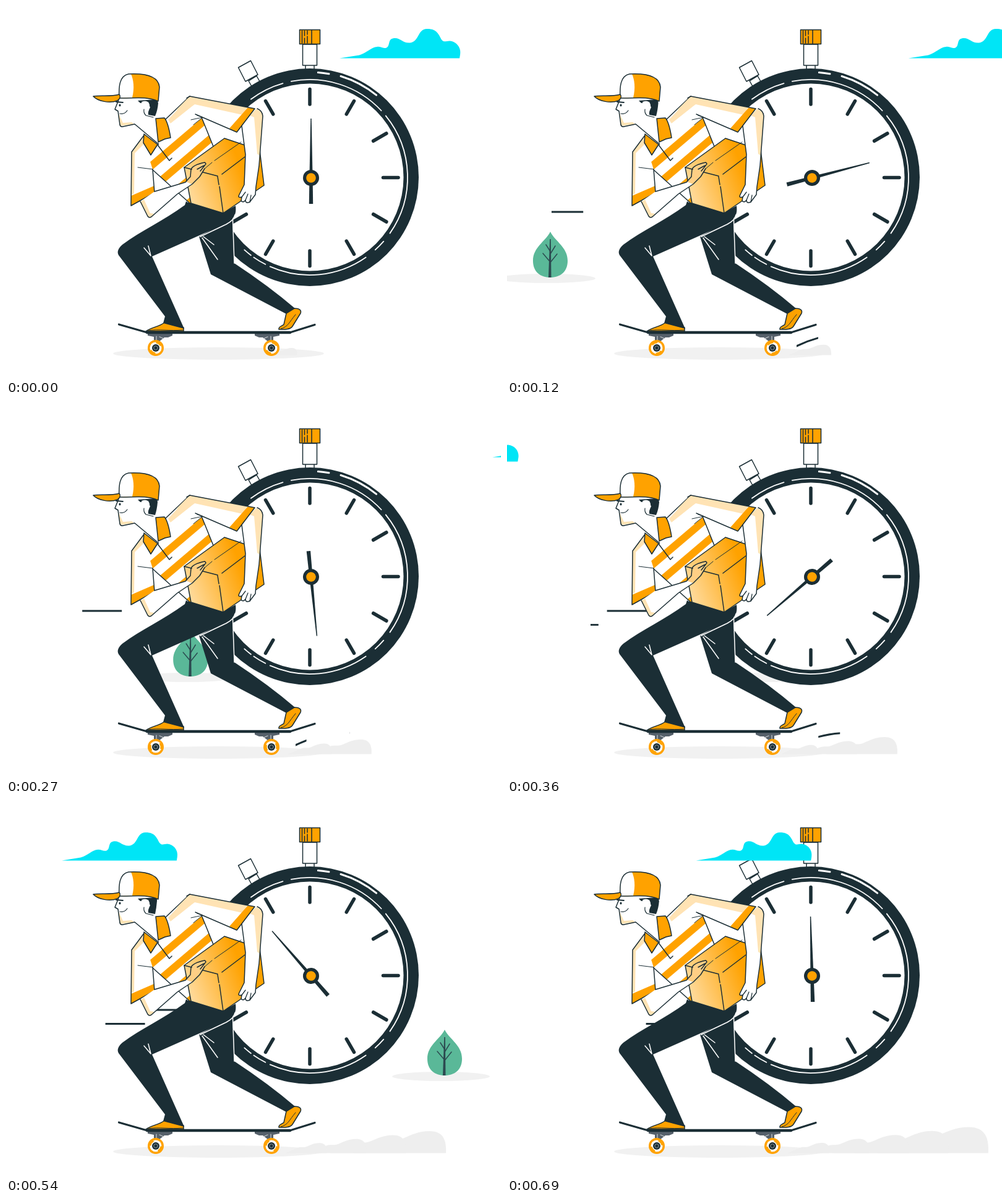
These frames come from a looping animation (800 by 600 pixels, 720 ms). An HTML page with a canvas:

```html
<!DOCTYPE html>
<html lang="en">
<head>
<meta charset="utf-8">
<title>Express delivery</title>
<style>
html, body { margin: 0; width: 100%; height: 100%; overflow: hidden; background: #fff; }
canvas { display: block; }
</style>
</head>
<body>
<canvas id="stage" width="800" height="600"></canvas>
<script>
const ctx = document.getElementById('stage').getContext('2d');
const LOOP = 720, STEP = 30;
const DARK = '#1b2e35', ORANGE = '#ffa200', CREAM = '#ffe3b4', CYAN = '#00e5f6', WHITE = '#fff';
const SHADOW = '#f1f1f1', DUST = '#eeeeee', GREEN = '#5ab898';
const rad = deg => deg * Math.PI / 180;

function fill(d, color) {
  ctx.fillStyle = color;
  ctx.fill(new Path2D(d));
}

function line(d, width = 1.5, color = DARK, cap = 'round') {
  ctx.strokeStyle = color;
  ctx.lineWidth = width;
  ctx.lineCap = cap;
  ctx.lineJoin = 'round';
  ctx.stroke(new Path2D(d));
}

function shape(d, color, width = 1.5) {
  fill(d, color);
  line(d, width);
}

function oval(x, y, rx, ry, color) {
  ctx.fillStyle = color;
  ctx.beginPath();
  ctx.ellipse(x, y, rx, ry, 0, 0, Math.PI * 2);
  ctx.fill();
}

function arc(x, y, r, from, to, width, color) {
  ctx.strokeStyle = color;
  ctx.lineWidth = width;
  ctx.lineCap = 'round';
  ctx.beginPath();
  ctx.arc(x, y, r, rad(from), rad(to));
  ctx.stroke();
}

function at(x, y, scale, angle, draw) {
  ctx.save();
  ctx.translate(x, y);
  ctx.rotate(angle);
  ctx.scale(scale, scale);
  draw();
  ctx.restore();
}

// Constant start, soft landing: cubic-bezier(.167, .167, .667, 1).
function settle(p) {
  const curve = (a, b, s) => 3 * a * s * (1 - s) ** 2 + 3 * b * s * s * (1 - s) + s ** 3;
  let lo = 0, hi = 1;
  for (let i = 0; i < 24; i++) {
    const mid = (lo + hi) / 2;
    if (curve(.167, .667, mid) < p) lo = mid; else hi = mid;
  }
  return curve(.167, 1, lo);
}

function cloud(x, base, scale) {
  at(x, base, scale, 0, () => fill(
    'M0 0 L32 -5 C45 -9 51 -18 61 -18.5 C67 -19 70 -15 76 -17 C82 -20 78 -30 86 -32 ' +
    'C98 -35 101 -24 114 -25 C129 -27 126 -47 141 -47.5 C157 -48 160 -39 165 -30 ' +
    'C169 -25 172 -28 178 -28 C190 -27 197 -16 195 -6 L194 0 Z', CYAN));
}

function tree(x) {
  oval(x - 6, 440.5, 79, 7.5, SHADOW);
  at(x, 439, 1, 0, () => {
    fill('M0 -74 C8 -58 28 -49 28 -27 C28 -9 16 0 0 0 C-16 0 -28 -9 -28 -27 C-28 -49 -8 -58 0 -74', GREEN);
    fill('M-3 0 L-.8 -62 L.8 -62 L1.5 0 Z', '#2c4a50');
    line('M-1 -23 L11 -38 M-1 -26 L-12 -39 M0 -38 L8 -51 M0 -42 L-7 -53', 1.5, '#2c4a50');
  });
}

function stopwatch() {
  const x = 491, y = 277;
  shape('M392 121 L405 113 L410 122 L397 130 Z', WHITE);
  shape('M375.5 99.5 L395.5 88.5 L407 111 L387 122 Z', WHITE);
  shape('M484 95 H498 V103 H484 Z', WHITE);
  shape('M479.5 62 H502.5 V96 H479.5 Z', WHITE);
  shape('M474.5 38.5 H507.5 V61.5 H474.5 Z', ORANGE);
  line('M478.5 40 V60 M482.5 40 V48 M482.5 52 V60 M487 40 V46 M487 49 V60 M494 39 V61');
  oval(x, y, 176, 176, DARK);
  oval(x, y, 151.5, 151.5, WHITE);
  [[233, 254], [259, 317], [321, 395], [41, 48], [55, 114], [117, 125], [127, 132]]
    .forEach(([from, to]) => arc(x, y, 158, from, to, 1.8, WHITE));
  arc(x, y, 170, 274.5, 280.5, 3, WHITE);
  arc(x, y, 171, 287, 309, 3, WHITE);
  for (let i = 0; i < 12; i++) at(x, y + .5, 1, rad(i * 30), () => line('M0 -118.5 V-143', 5.5));
}

function hand(t) {
  at(493, 278, 1, rad(360 * settle(t / LOOP)), () => {
    fill('M-.7 -96 H.7 L2.6 0 L3.2 42 H-3.2 L-2.6 0 Z', DARK);
    oval(0, 0, 13, 13, DARK);
    oval(0, 0, 7.8, 7.8, ORANGE);
  });
}

// A streak grows to full length from its origin, then slides on.
function streak(age, origin, y) {
  if (age <= 0) return;
  const head = origin + .4267 * age;
  line(`M${Math.max(origin, head - 64)} ${y} H${head}`, 2.8, DARK, 'butt');
}

function kick(age) {
  const from = 468, to = 556, head = Math.min(to, from + .585 * age), tail = Math.max(from, from + .585 * age - 35);
  if (age <= 0 || tail >= to) return;
  ctx.save();
  ctx.beginPath();
  ctx.rect(tail, 520, head - tail, 40);
  ctx.clip();
  line('M467 550.5 Q513 528 560 530.5', 3, DARK, 'butt');
  ctx.restore();
}

function puff(age) {
  if (age < 0) return;
  at(470.5 + .4455 * age, 564.5, 11.5 + .0443 * age, 0, () => fill(
    'M0 0 C.03 -.55 -.1 -1 -.75 -1 C-1.25 -1 -1.6 -.82 -2 -.65 C-2.3 -.52 -2.5 -.63 -2.8 -.55 ' +
    'C-3.4 -.38 -3.7 -.05 -4.3 0 Z', DUST));
}

function legs() {
  fill('M312 373 L366 343 L369 416 Q425 453 467 489 L453 498 L331 434 Z', DARK);
  line('M366.5 346 L369 416', 1.5, WHITE);
  line('M317 375 L342 410 M319 373 L336 386', 1.5, WHITE);
  shape('M453 497 L466 489 C474 489 478 492 476 497 L463 518 C459 524 449 523 441 523 C440 518 446 518 449 515 Z', ORANGE);
  line('M444 522 C456 519 457 512 468 499', 1);
  shape('M226 526 C236 519 247 519 256 512 L287 520 V526 Z', ORANGE);
  line('M229 525 C248 522 263 526 286 524', 1);
  fill('M291 316 L351 334 L371 323 C373 338 368 345 353 353 L236 405 L288 522 L254 513 L257 502 ' +
    'L182 403 C179 398 181 392 188 386 C217 364 255 347 289 322 Z', DARK);
  line('M314 373 L356 353 Q369 346 370 338', 1.8, WHITE);
  line('M223 391 L234 404 L230 388', 1.5, WHITE);
}

function torso() {
  fill('M222 209 L262 184 L297 146 L385 185 L390 260 L340 318 H294 L228 256 Z', WHITE);
  ctx.save();
  ctx.clip(new Path2D('M227 256 L316 180 L335 227 L340 318 L296 318 Z'));
  for (let i = 0; i < 4; i++) {
    const x = 233 + 21.5 * i, y = 260 + 19 * i;
    line(`M${x} ${y} l100 -85`, 12, ORANGE, 'square');
  }
  ctx.restore();
  line('M227 256 L296 318 M316 180 L335 227');
  fill('M262 184 L297 146 L390 165 L381 175 L305 159 L266 190 Z', CREAM);
  fill('M266 190 L305 159 L318 180 L280 200 Z', WHITE);
  line('M257 184 L297 146');
  line('M318 180 L299 184 M318 180 L303 192 M318 180 L309 177', 1);
}

function nearSleeve() {
  fill('M223 209 L203 236 L202 323 L240 302 L237 264 L228 236 Z', WHITE);
  fill('M223 210 L203 236 L202 306 L207 303 L208 238 L224 222 Z', CREAM);
  fill('M202 307 L239 291 L240 302 L202 323 Z', ORANGE);
  line('M223 209 L203 236 L202 323 L240 302 L237 264');
  line('M213 261 L237 264', 1);
}

function parcel() {
  const box = 'M288 261 L353 214 L410 233 L417 290 L351 335 L299 319 Z';
  const glow = ctx.createLinearGradient(292, 302, 382, 268);
  glow.addColorStop(0, '#ffdca0');
  glow.addColorStop(1, ORANGE);
  shape(box, glow);
  line('M288 261 L342 275 M349 272 L386 244 M342 276 L344 289 M345 292 L351 335');
  line('M320 264 L333 253 M337 250 L380 220', 1);
}

function nearArm() {
  fill('M217 316 L229 340 Q232 344 236 340 L275 305 L302 288 L291 284 L240 300 Z', WHITE);
  fill('M217 317 L229 340 Q232 344 236 340 L240 336 L233 335 L223 313 Z', CREAM);
  fill('M291 284 L298 276 L302 259 L322 253 Q325 256 318 259 L321 262 L313 276 L300 288 Z', '#ffcf85');
  line('M217 316 L229 340 Q232 344 236 340 L277 304 L301 288 L313 276 L321 263');
  line('M240 300 L290 285 L298 276 L299 264 Q302 257 321 253 Q326 256 318 259 L309 264 M321 258 L314 267');
}

function farArm() {
  const limb = 'M381 194 L387 240 L385 289 L377 305 Q374 311 381 309 L380 315 Q383 319 387 314 ' +
    'Q387 320 394 317 L403 305 L404 292 L409 258 L415 178 Q414 169 406 166';
  fill(limb, WHITE);
  fill('M404 167 Q414 169 415 177 L410 242 L406 239 L401 180 L394 177 Z', CREAM);
  line(limb);
  line('M381 309 L387 301 M387 314 L391 304 M394 317 L396 306', 1.3);
  fill('M297 146 L402 166 L373 204 L318 180 Z', WHITE);
  fill('M297 146 L390 164 L382 176 L305 159 L282 171 L276 167 Z', CREAM);
  fill('M391 164 L402 166 L373 204 L361 198 Z', ORANGE);
  line('M292 149 L297 146 L402 166 L373 204 L306 175');
}

function head(t) {
  const sway = Math.cos(2 * Math.PI * t / 360);
  fill('M208 191 L222 172 L240 178 L245 222 Z', WHITE);
  fill('M183 147 L176 166 L181 170 L184 194 L208 191 L226 178 L238 150 Z', WHITE);
  fill('M181 172 L184 194 L207 191 L203 188 L189 189 Z', CREAM);
  line('M182 152 L176 167 L181 170 L184 192 Q185 196 189 195 L208 191 L245 222');
  line('M178 155 L189 156', 1.8);
  oval(184, 160.5, 1.5, 2, DARK);
  line('M184 174 Q191 176 196 169', 1.2);
  fill(`M213 153 L244 151 L${245 + sway} 157 Q${244 + sway} 169 241 178 L230 176 Q229 171 233 164 ` +
    'L229 155 L217 157 Z', DARK);
  fill('M219 155 Q230 151 232 160 Q232 167 224 168 Z', WHITE);
  line('M223 167 Q222 173 226 177 L238 180', 1.2);
  shape('M242 182 L256 181 Q262 188 266 213 L257 215 L246 220 Z', ORANGE);
  shape('M223 207 L245 224 L234 241 L222 221 Z', ORANGE);
  line('M246 222 V226 L264 250 L268 246');
  const crown = 'M183 149 C182 131 183 113 198 110 C218 109 246 111 248 131 L246 154 C224 145 205 150 183 149 Z';
  fill(crown, ORANGE);
  fill('M183 149 C182 131 183 113 198 110 H202 C206 119 208 132 204 148 Z', WHITE);
  line(crown);
  shape('M141 146 C153 144 169 147 183 143 Q187 148 180 153 C168 158 148 154 141 146 Z', ORANGE);
}

function wheel(x, angle) {
  oval(x, 553, 13, 13, ORANGE);
  oval(x, 553, 9.5, 9.5, WHITE);
  at(x, 553, 1, angle, () => {
    arc(0, 0, 8.7, 100, 150, 2.5, ORANGE);
    arc(0, 0, 8.7, 280, 330, 2.5, ORANGE);
  });
  oval(x, 553, 6, 6, DARK);
  arc(x, 553, 3.2, 0, 360, 1, '#8a9499');
}

function skateboard(t) {
  [[242, 1], [429, -1]].forEach(([x, side]) => {
    ctx.save();
    ctx.translate(x, 0);
    ctx.scale(side, 1);
    fill('M-13 530 H27 V533 L20 536 L14 536 L5 543 H-3 V535 L-13 533 Z', '#56616b');
    line('M1 534 V541 M6 535 L13 538', 1.2, '#c9ced2');
    ctx.restore();
    wheel(x, rad(-360 * t / LOOP));
  });
  line('M182.5 515 L228 528 H459 L499 515.5', 3.2);
  line('M228 528 H459', 4.4);
}

function draw(t) {
  ctx.fillStyle = WHITE;
  ctx.fillRect(0, 0, 800, 600);
  tree(70 + 1.5214 * (t - 120));
  stopwatch();
  cloud(539 + .915 * t, 84.4, 1);
  if (t > 330) cloud(4 + 1.436 * (t - 480), 91.4, .957);
  streak(t, 72, 333);
  streak(t - 330, 135, 355.5);
  oval(343.5, 562, 170.5, 10, SHADOW);
  for (let i = 0; i < 5; i++) puff(t - 144 * i);
  kick(t - 60);
  kick(t - 240);
  legs();
  torso();
  nearSleeve();
  parcel();
  nearArm();
  farArm();
  head(t);
  skateboard(t);
  hand(t);
}

function tick() {
  draw(Math.floor(performance.now() % LOOP / STEP) * STEP);
  requestAnimationFrame(tick);
}
tick();
</script>
</body>
</html>
```
